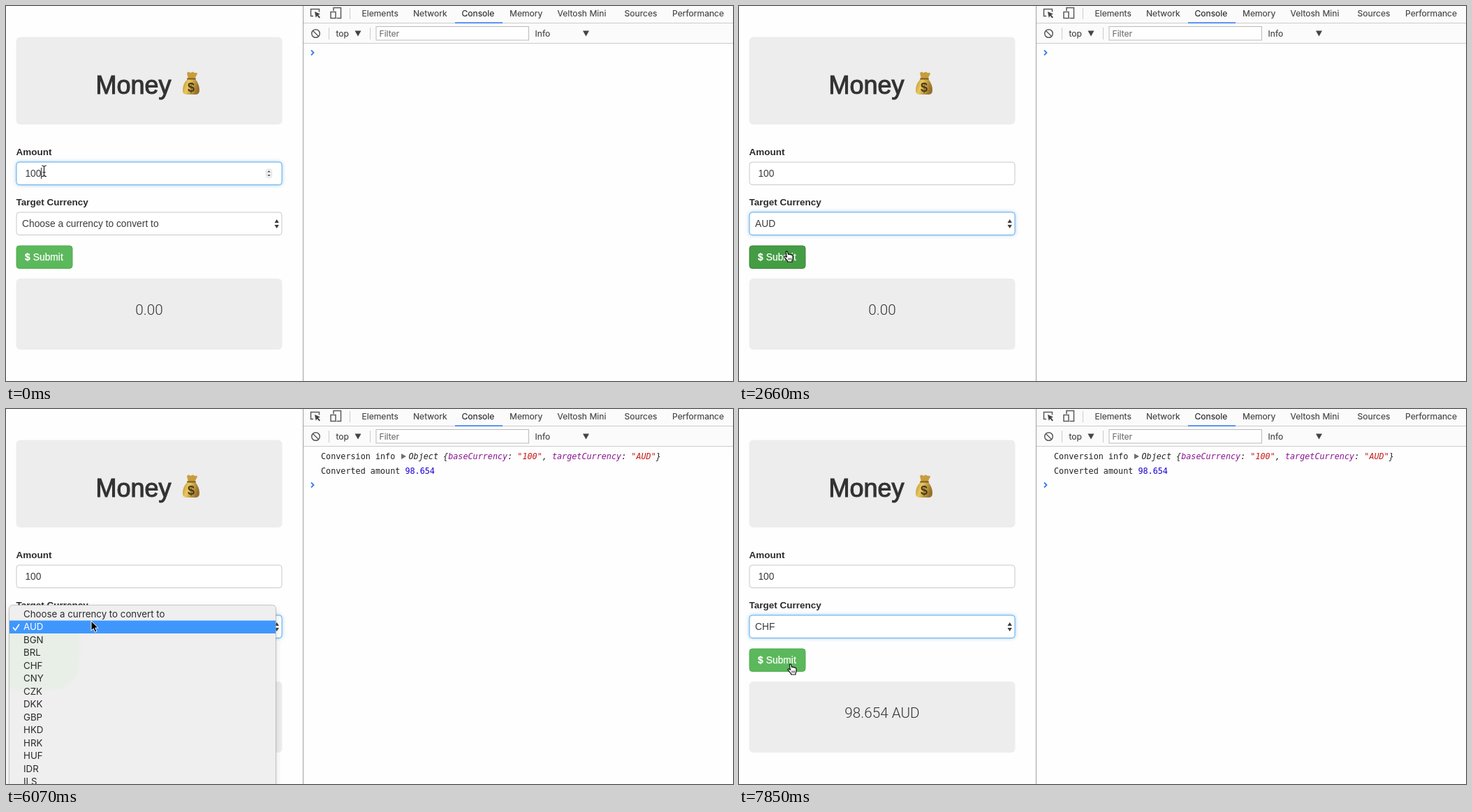
Recreate the animation shown at these times as an HTML page. Size 1041 by 538 pixels, loop 8 s.

```html
<!DOCTYPE html>
<html lang="en">
<head>
<meta charset="utf-8">
<title>Currency converter</title>
<style>
  html, body { margin: 0; width: 100%; height: 100%; overflow: hidden; background: #fefefe; }
  svg { display: block; width: 100%; height: 100%; }
  text { white-space: pre; }
  .page { font: 13.8px "Liberation Sans", Arial, sans-serif; fill: #3c3c3c; }
  .label { font-weight: bold; font-size: 13.5px; fill: #2b2b2b; }
  .title { font-size: 36px; fill: #333; stroke: #333; stroke-width: 1.1px; }
  .result { font: 300 20.7px Roboto, sans-serif; fill: #333; text-anchor: middle; }
  .panel { fill: #ededed; }
  .field { fill: #fff; stroke: #c8c8c8; }
  .field.blur { stroke: #86bce6; }
  .field.focus { stroke: #66afe9; filter: drop-shadow(0 0 2.5px rgba(102, 175, 233, .7)); }
  .button { fill: #5cb85c; stroke: #4cae4c; }
  .button.dark { fill: #449d44; stroke: #398439; }
  .ring { fill: none; stroke: #4f9ce6; stroke-width: 2; filter: drop-shadow(0 0 1px #4f9ce6); }
  .caption { fill: #fff; stroke: #fff; stroke-width: .25px; }
  .tools { font: 12.1px Inter, sans-serif; fill: #444; }
  .tools text { stroke: currentColor; stroke-width: .15px; color: #444; }
  .line { stroke: #ccc; fill: none; }
  .icon { stroke: #5a5a5a; stroke-width: 1.5; fill: none; }
  .log { font: 11.78px "DejaVu Sans Mono", monospace; fill: #222; }
  .log .object { font-style: italic; }
  .key { fill: #881391; } .string { fill: #c41a16; } .number { fill: #1c00cf; }
  .prompt { fill: none; stroke: #367cf1; stroke-width: 1.8; }
  .menu { font: 13.3px Inter, sans-serif; fill: #2a2a2a; }
  .sheet { fill: #efefef; stroke: rgba(0, 0, 0, .2); filter: drop-shadow(0 4px 4px rgba(0, 0, 0, .14)); }
  .outline { stroke: #fff; stroke-width: 1; }
</style>
</head>
<body>
<svg viewBox="0 0 1041 538">
  <defs>
    <linearGradient id="gold" x1="0" x2="1" y2=".3">
      <stop offset="0" stop-color="#b98c2c"/><stop offset=".4" stop-color="#e9c95f"/><stop offset="1" stop-color="#97702a"/>
    </linearGradient>
    <filter id="soft"><feGaussianBlur stdDeviation="2.5"/></filter>
    <clipPath id="sheetClip"><rect x="5" y="0" width="381" height="260"/></clipPath>
  </defs>
  <rect width="1041" height="538" fill="#fefefe"/>

  <g class="page">
    <rect class="panel" x="14.5" y="44.5" width="381" height="125.5" rx="6"/>
    <text class="title" x="128.5" y="126">Money</text>
    <g id="bag">
      <path d="M259 96q3-3 5 0q4-3 6 0q4-1 4 1l-4 8h-9z" fill="#c99d3c"/>
      <path d="M261 104h9c4 4 7 10 7 17q0 6-6 6h-12q-6 0-6-6c0-7 3-13 8-17z" fill="url(#gold)"/>
      <path d="M260 104.5h11" stroke="#7d5a1f" stroke-width="2" stroke-linecap="round"/>
      <text x="265" y="123" text-anchor="middle" font-size="18" font-weight="bold" fill="#4b3917">$</text>
    </g>

    <text class="label" x="14.5" y="214">Amount</text>
    <rect id="amount" x="15" y="224" width="380" height="32.5" rx="4"/>
    <text x="27.4" y="245">100</text>
    <g id="typing">
      <path d="M50.5 232v16" stroke="#333"/>
      <rect x="372.5" y="234" width="8" height="12.5" rx="3" fill="#f4f4f4" stroke="#ddd"/>
      <path d="M374.2 238.5l2.3-2.5 2.3 2.5zM374.2 242l2.3 2.5 2.3-2.5z" fill="#555"/>
    </g>

    <text class="label" x="14.5" y="286">Target Currency</text>
    <rect id="select" x="15" y="296" width="380" height="32.5" rx="4"/>
    <text id="value" x="23" y="317"></text>
    <path d="M384.5 311l3.2-5 3.2 5zM384.5 314l3.2 5 3.2-5z"/>

    <rect id="button" x="15" y="344" width="80" height="32.5" rx="4"/>
    <rect id="ring" class="ring" x="14" y="343" width="82" height="34.5" rx="2"/>
    <text class="caption" x="27" y="365" font-weight="bold">$</text>
    <text class="caption" x="38.8" y="365">Submit</text>

    <rect class="panel" x="14.5" y="391" width="381" height="102" rx="6"/>
    <text id="result" class="result" x="205" y="443"></text>
  </g>

  <g class="tools">
    <rect x="426" width="615" height="538" fill="#fefefe"/>
    <rect x="426" width="615" height="53" fill="#fbfbfb"/>
    <path class="line" d="M426 24.5h615M426 53.5h615M492.5 3v16M462.5 31v17M521.5 31v17"/>
    <path d="M425.5 0v538" stroke="#a0a0a0"/>
    <path d="M643 24.2h68" stroke="#4285f4" stroke-width="1.7"/>
    <path class="icon" d="M440 14.5h-3.5v-10h12v4"/>
    <path d="M442 8l8 3.5-3 1.3 3 3.5-1.5 1.2-3-3.5-1.8 2.7z"/>
    <path class="icon" d="M469 7v-4.5h10.5v15h-6M465 8.5h7v9h-7z"/>
    <circle class="icon" cx="443.5" cy="39.5" r="5.8"/>
    <path class="icon" d="M439.5 35.5l8 8"/>
    <g id="tabs"></g>
    <text x="472.5" y="44">top</text>
    <rect x="530" y="29.5" width="218.5" height="19.5" fill="#fefefe" stroke="#bbb"/>
    <text x="534.5" y="44" style="fill: #707070; color: #707070">Filter</text>
    <text x="757.5" y="44">Info</text>
    <path d="M499.5 35.5h9l-4.5 8zM826 35.5h9l-4.5 8z"/>
  </g>

  <g class="log">
    <g id="log1">
      <text x="451" y="72">Conversion info</text>
      <path d="M566 64l7 4-7 4z" fill="#6e6e6e"/>
      <text class="object" x="576.5" y="72">Object {<tspan class="key">baseCurrency</tspan>: <tspan class="string">"100"</tspan>, <tspan class="key">targetCurrency</tspan>: <tspan class="string">"AUD"</tspan>}</text>
    </g>
    <text id="log2" x="451" y="92.5">Converted amount <tspan class="number">98.654</tspan></text>
    <path id="prompt" class="prompt" d="M437 -3.5l3.5 3.5-3.5 3.5"/>
  </g>

  <g id="menu" class="menu">
    <rect class="sheet" x="4.5" y=".5" width="382" height="290" rx="5"/>
    <g clip-path="url(#sheetClip)">
      <path id="tint" d="M0 24H104V70Q104 111 60 111H0z" fill="#e7efe6" filter="url(#soft)"/>
    </g>
    <rect id="highlight" x="5" width="381" height="18.5" fill="#3f97fe"/>
    <path id="check" d="M10 0l3.3 4 5.7-8.5" fill="none" stroke-width="1.7"/>
    <g id="rows"></g>
  </g>

  <g id="ibeam">
    <path d="M-3.5-7.5q3 0 3.5 1.5q.5-1.5 3.5-1.5M0-6v12.5M-3.5 8q3 0 3.5-1.5q.5 1.5 3.5 1.5M-2 2h4" fill="none" stroke="#222" stroke-width="1.2"/>
  </g>
  <path id="arrow" class="outline" d="M0 0V14L3.2 11 5.5 16.2 8 15.1 5.7 10.1H10z"/>
  <g id="hand" fill="#fff" stroke="#111" stroke-width="1.2" stroke-linejoin="round">
    <path d="M3.2 1.6Q4.3.3 5.4 1.5L6.6 5.4Q8 4.6 8.7 5.6Q10.2 4.9 10.9 6.1Q12.6 5.8 13 7.4V11Q12.9 13 12 14.2V16H5.6L5.5 14.6Q3.6 12.5 1 9.3Q.6 7.6 2.2 7.8L4.4 9.3Z"/>
    <path d="M6.8 10.5v3M8.7 10.5v3M10.6 10.5v3" stroke-width=".8"/>
  </g>
</svg>
<script>
const LOOP = 8000, ROW = 18.5, MENU_TOP = 299.3;
const PLACEHOLDER = 'Choose a currency to convert to';
const OPTIONS = [PLACEHOLDER, ...'AUD BGN BRL CHF CNY CZK DKK GBP HKD HRK HUF IDR ILS'.split(' ')];
const TABS = { Elements: 509.5, Network: 583, Console: 652.5, Memory: 721, 'Veltosh Mini': 789.5, Sources: 885.5, Performance: 954 };

const $ = id => document.getElementById(id);
const addText = (parent, x, y, content) => {
  const node = document.createElementNS('http://www.w3.org/2000/svg', 'text');
  node.setAttribute('x', x);
  node.setAttribute('y', y);
  node.textContent = content;
  return parent.appendChild(node);
};
const move = (id, x, y) => $(id).setAttribute('transform', `translate(${x} ${y})`);
const show = (id, visible) => { $(id).style.display = visible ? '' : 'none'; };

for (const [name, x] of Object.entries(TABS)) {
  addText($('tabs'), x, 14.5, name).style.fill = name === 'Console' ? '#222' : '';
}
const rows = OPTIONS.map((name, i) => addText($('rows'), 25, 18.2 + i * ROW, name));

const start = {
  cursor: 'ibeam', x: 54.5, y: 236.5, amount: 'focus', select: '', button: '', ring: false,
  shown: 0, menu: 0, lit: 0, logs: 0
};
const at = (x, y, more) => ({ x, y, ...more });
const arrow = (x, y, more) => at(x, y, { cursor: 'arrow', ...more });
const hand = (x, y, more) => at(x, y, { cursor: 'hand', ...more });

// Each step changes only what it names.
const steps = [
  [0, start],
  [300, at(64, 246)],
  [440, arrow(86, 272)],
  [590, arrow(103, 305)],
  [730, at(105, 310, { menu: 1, amount: 'blur', select: 'focus' })],
  [880, { amount: '' }],
  [1030, at(100, 316)],
  [1180, at(90, 324, { lit: 1 })],
  [1320, at(82.5, 329.5)],
  [2070, { menu: .6 }],
  [2220, { menu: 0, shown: 1 }],
  [2370, at(80, 336)],
  [2510, hand(70, 346, { button: 'dark' })],
  [2660, at(64, 351)],
  [2810, at(62, 353)],
  [3100, { logs: 1, select: '', ring: true }],
  [3250, { logs: 2 }],
  [3550, at(61, 353)],
  [4290, at(65, 350)],
  [4440, arrow(92, 335)],
  [4580, at(118, 310)],
  [4730, at(134, 293)],
  [4880, at(131, 294)],
  [5030, at(125, 295.5)],
  [5470, { menu: .9, lit: 0, select: 'focus', button: '', ring: false }],
  [5620, { menu: 1 }],
  [6070, at(122, 304, { lit: 1 })],
  [6220, at(115, 325)],
  [6360, at(108, 343, { lit: 2 })],
  [6510, at(102.5, 360, { lit: 3 })],
  [6660, at(101, 365, { lit: 4 })],
  [6810, at(101, 366)],
  [7410, { menu: .6 }],
  [7560, { menu: 0, shown: 4 }],
  [7700, hand(80, 366)],
  [7850, at(69, 365)]
];
let state = {};
const timeline = steps.map(([time, change]) => [time, state = { ...state, ...change }]);

function drawMenu(s) {
  show('menu', s.menu);
  $('menu').setAttribute('opacity', s.menu);
  move('menu', 0, MENU_TOP - s.shown * ROW);
  move('tint', 0, s.shown * 11);
  $('highlight').setAttribute('y', 4.2 + s.lit * ROW);
  move('check', 0, 14 + s.shown * ROW);
  $('check').setAttribute('stroke', s.lit === s.shown ? '#fff' : '#333');
  rows.forEach((row, i) => { row.style.fill = i === s.lit ? '#fff' : ''; });
}

function draw(s) {
  $('amount').setAttribute('class', `field ${s.amount}`);
  $('select').setAttribute('class', `field ${s.select}`);
  $('button').setAttribute('class', `button ${s.button}`);
  show('typing', s.amount === 'focus');
  show('ring', s.ring);
  $('value').textContent = OPTIONS[s.shown];
  $('result').textContent = s.logs > 1 ? '98.654 AUD' : '0.00';
  show('log1', s.logs > 0);
  show('log2', s.logs > 1);
  move('prompt', 0, 67 + s.logs * 21);
  drawMenu(s);
  for (const id of ['ibeam', 'arrow', 'hand']) show(id, id === s.cursor);
  move(s.cursor, s.x, s.y);
}

let drawn;
function tick() {
  const time = performance.now() % LOOP;
  const current = timeline.findLast(([begin]) => begin <= time)[1];
  if (current !== drawn) draw(drawn = current);
  requestAnimationFrame(tick);
}
tick();
</script>
</body>
</html>
```
